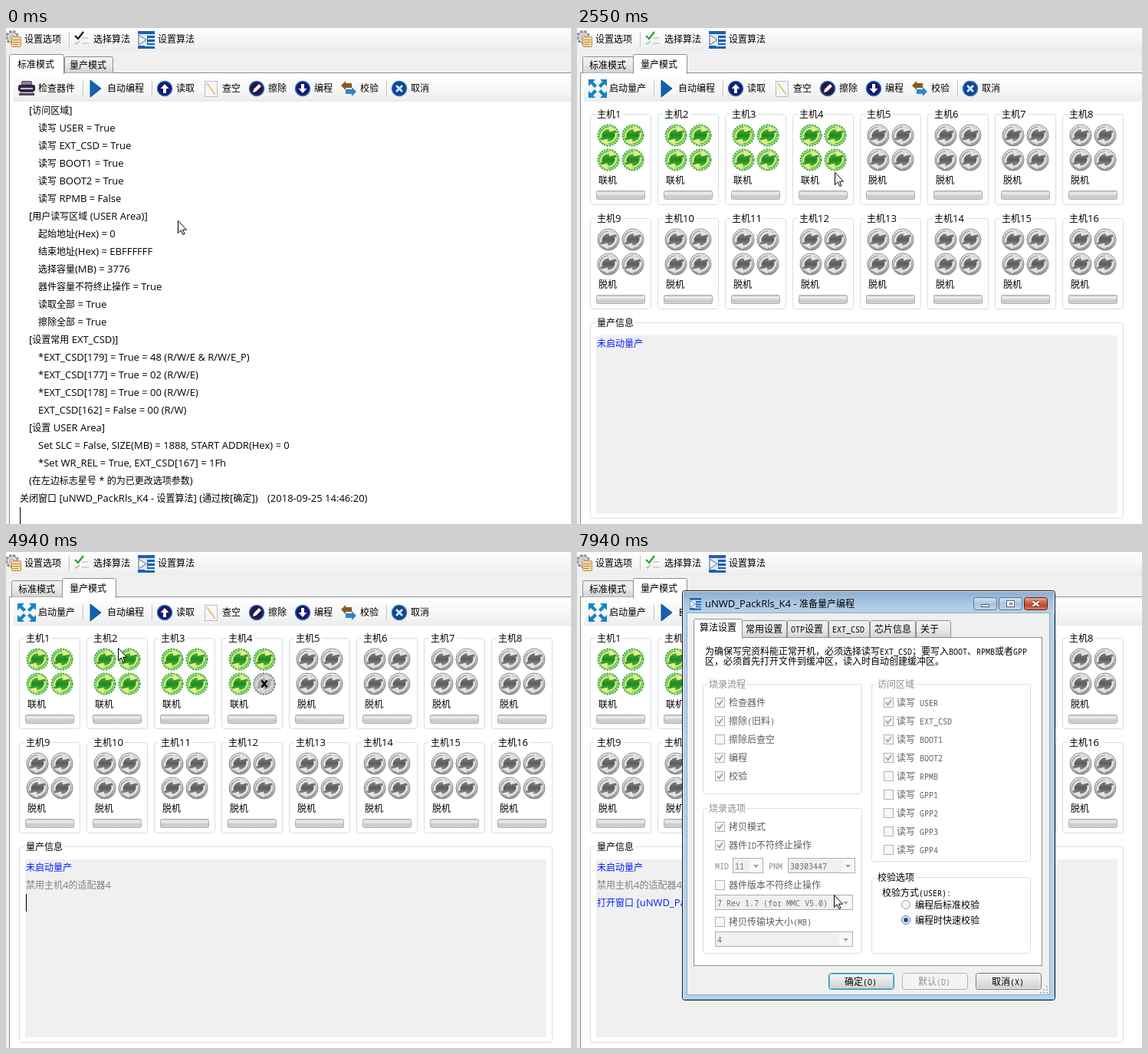
These frames come from a looping animation (737x647 px, 8000 ms). An HTML page:

```html
<!DOCTYPE html>
<html lang="zh-CN">
<head>
<meta charset="utf-8">
<title>量产模式</title>
<style>
html, body { margin: 0; width: 100%; height: 100%; overflow: hidden; background: #fff; }
svg { display: block; }
text { white-space: pre; font-family: 'Open Sans', 'Noto Sans', sans-serif; font-size: 13px; }
.c { font-family: 'Noto Sans CJK SC', 'Noto Sans CJK', 'Noto Sans CJK JP', sans-serif; font-size: 12px; }
.m { font-family: 'Noto Sans Mono', 'DejaVu Sans Mono', monospace; font-size: 10px; }
</style>
</head>
<body>
<svg id="stage" width="737" height="647" viewBox="0 0 737 647"></svg>
<script>
const LOOP = 8000;
const JOB = 'uNWD_PackRls_K4';
const GRAY = '#808080', LINE = '#d5dfe5';

// ---------- drawing helpers ----------
const text = (x, cy, s, fill = '#000', o = {}) =>
  `<text x="${x}" y="${cy + 4.5}" fill="${fill}" text-anchor="${o.mid ? 'middle' : 'start'}">` +
  s.match(/[\x20-\x7e]+|[^\x20-\x7e]+/g).map(run =>
    `<tspan class="${run.charCodeAt(0) > 126 ? 'c' : o.mono ? 'm' : ''}">${run}</tspan>`).join('') + '</text>';
const mono = (x, cy, s, fill, mid) => text(x, cy, s, fill, { mono: true, mid });
const rect = (x, y, w, h, fill, stroke, r = 0) => stroke
  ? `<rect x="${x + .5}" y="${y + .5}" width="${w - 1}" height="${h - 1}" rx="${r}" fill="${fill}" stroke="${stroke}"/>`
  : `<rect x="${x}" y="${y}" width="${w}" height="${h}" rx="${r}" fill="${fill}"/>`;
const path = (d, fill = 'none', stroke = 'none', w = 1) =>
  `<path d="${d}" fill="${fill}" stroke="${stroke}" stroke-width="${w}"/>`;
const disc = (x, y, r, fill, stroke = 'none', w = 1) =>
  `<circle cx="${x}" cy="${y}" r="${r}" fill="${fill}" stroke="${stroke}" stroke-width="${w}"/>`;
const at = (x, y, body) => `<g transform="translate(${x} ${y})">${body}</g>`;
const layer = (id, body, extra = '') => `<g id="${id}" ${extra}>${body}</g>`;
const grad = (id, ...stops) => `<linearGradient id="${id}" x2="0" y2="1">` +
  stops.map((c, i) => `<stop offset="${i / (stops.length - 1)}" stop-color="${c}"/>`).join('') + '</linearGradient>';
const box = (x, y, X, Y) => `M${x} ${y}H${X}V${Y}H${x}Z`;
const rule = (x, y, h) => rect(x, y, 1, h, '#bdbdbd') + rect(x + 1, y, 1, h, '#fff');

// Group box with a caption cutting its top edge
const group = (x, y, w, h, label, gap, draw = text, fill = '#000', dx = 9) =>
  rect(x, y, w, h, 'none', LINE, 3) + rect(x + dx - 2, y, gap + 4, 1, '#fff') + draw(x + dx, y, label, fill);

// ---------- icons ----------
const arrowPair = (color, w) => [0, 180].map(a => `<g transform="rotate(${a})">` +
  path('M-9.5 3.5A10 10 0 0 1 1 -9', 'none', color, w) + path('M0 -12.5L10.5 -7L1 -4.5Z', color) + '</g>').join('');
const rim = color => `<circle r="13.6" fill="none" stroke="${color}" stroke-width="1.6" stroke-dasharray="2.2 1.4"/>`;
const defs = `<defs>
${grad('bar', '#fdfdfd', '#f7f7f7', '#ececec')}
${grad('tabOff', '#f2f2f2', '#ebebeb', '#d2d2d2')}
${grad('btn', '#f3f3f3', '#ebebeb', '#dcdcdc', '#cfcfcf')}
${grad('hot', '#eaf6fd', '#d9f0fc', '#bee6fd', '#a7d9f5')}
${grad('meter', '#bcbcbc', '#f1f1f1', '#d6d6d6', '#c6c6c6', '#dedede')}
${grad('title', '#8caed0', '#a9c6e2', '#b9d1ea')}
${grad('cap', '#d4e4f3', '#a9c4de', '#bfd6ea')}
${grad('close', '#eab39c', '#d7694a', '#c0452c', '#d98b62')}
${grad('silver', '#f4f4f4', '#c9c9c9', '#8d8d8d')}
${grad('steel', '#8e8e8e', '#5c5c5c', '#a8a8a8')}
${grad('leaf', '#5fb95a', '#1e8a20', '#59c24a')}
${grad('ask', '#6ea5ea', '#1d52b4', '#3f86dc')}
${grad('tip', '#ffffff', '#e4e5f0')}
<g id="off">${disc(0, 0, 14, 'url(#silver)', '#868686')}${disc(0, 0, 11.5, 'url(#steel)')}${arrowPair('#e4e4e4', 2.8)}</g>
<g id="on">${disc(0, 0, 13.6, '#a9e58f')}${rim('#279a2b')}${disc(0, 0, 11.6, 'url(#leaf)')}${arrowPair('#cfee7c', 2.6)}
${path('M2 -12L10 -7L3 -5ZM-2 12L-10 7L-3 5Z', '#f6ec86')}</g>
<g id="ban">${disc(0, 0, 13.6, '#d2d2d2')}${rim('#777')}${disc(0, 0, 11.4, '#a9a9a9')}${arrowPair('#dadada', 2.6)}
${path('M-3.6 -4.5L3.6 4.5M3.6 -4.5L-3.6 4.5', 'none', '#000', 2.4)}</g>
<g id="list">${rect(0, 0, 22, 23, '#1c62ad')}${rect(0, 4, 12, 15, '#dfeaf6')}${path('M1 5L11 11.5L1 18Z', '#f2f2f2', '#4a6c91')}
${[4, 9, 14, 18].map((y, i) => rect(i % 3 ? 13 : 9, y, i % 3 ? 9 : 13, 2, '#cfe6fb')).join('')}</g>
<clipPath id="holes"><path clip-rule="evenodd" d="${box(137, 50, 624, 585)}${box(164, 121, 596, 153)}${box(164, 165, 372, 316)}${
  box(164, 325, 372, 525)}${box(384, 165, 592, 405)}${box(384, 417, 592, 525)}"/></clipPath>
</defs>`;
const use = (id, x, y, s = 1) => `<use href="#${id}" transform="translate(${x} ${y}) scale(${s})"/>`;

const gear = at(8, 12, `<circle r="7.5" fill="#cfcfcf" stroke="#8b8b8b" stroke-width="3" stroke-dasharray="3.2 2"/>` +
  disc(0, 0, 6.5, '#d8d8d8', '#999') + disc(0, 0, 2.5, '#fff', '#999')) +
  rect(7, 11, 13, 14, '#f5d9a4', '#b98a45', 1) + rect(9, 15, 9, 1, '#b98a45') + rect(9, 18, 9, 1, '#b98a45') + rect(9, 21, 7, 1, '#b98a45');
const checks = color => path('M90 10L94 14L101 5', 'none', color, 2.4) + path('M90 19L92 21L96 17', 'none', '#b5b5b5', 1.4) +
  rect(99, 12, 8, 2, '#d3d3d3') + rect(99, 19, 9, 2, '#d3d3d3');
const round = (x, body, fill = '#17186b') => at(x, 79, disc(0, 0, 9.6, fill, '#2f73c4', 1.4) + body);
const up = 'M0 -6L5.5 0H2V6H-2V0H-5.5Z';
const printer = rect(20, 69, 14, 6, '#8a8590', '#4c4454', 1) + rect(16, 74, 22, 9, '#3a2448', '#241530', 2) +
  rect(19, 78, 16, 2, '#c7bfd0') + rect(19, 83, 16, 5, '#d9d6dc', '#6b6472') + rect(17, 85, 20, 3, '#55475f');
const spread = at(27, 79, [0, 90, 180, 270].map(a => `<g transform="rotate(${a})">` +
  path('M-12 -12H-3L-6 -9L-1 -4L-4 -1L-9 -6L-12 -3Z', '#1583c7') + '</g>').join(''));

// ---------- main window ----------
const tools = rect(9, 63, 728, 33, 'url(#bar)') + rule(100, 69, 20) + rule(190, 69, 20) + rule(496, 69, 20) +
  path('M110 68L124 79L110 90Z', '#0e62b5', '#0a4d92') +
  round(207, path(up, '#fff')) +
  rect(259, 69, 17, 21, '#f6f6f8', '#b9bccb') + path('M262 72L273 87', 'none', '#e0b84c', 1.4) +
  round(327, path('M-5 5L-4 1L3 -6L6 -3L-1 4Z', '#fff'), '#2a1644') +
  round(387, `<g transform="rotate(180)">${path(up, '#fff')}</g>`) +
  path('M437 75L443 69V72H451V78H443V81Z', '#8a5a1f') + path('M457 83L451 77V80H443V86H451V89Z', '#2d86c9') +
  round(513, path('M-4 -4L4 4M4 -4L-4 4', 'none', '#cfe9ff', 2.8), '#14438f') +
  [['自动编程', 132], ['读取', 222], ['查空', 282], ['擦除', 342], ['编程', 402], ['校验', 462], ['取消', 528]]
    .map(([s, x]) => text(x, 78.5, s)).join('');

const tabPath = (x, X, y, y2) => `M${x + .5} ${y2}V${y + 2.5}Q${x + .5} ${y + .5} ${x + 2.5} ${y + .5}H${X - 2.5}Q${X - .5} ${y + .5} ${X - .5} ${y + 2.5}V${y2}`;
const tab = (x, X, on, extra = '') => path(tabPath(x, X, on ? 34 : 37, on ? 60 : 58.5), on ? '#fff' : 'url(#tabOff)', '#8c8e94') + extra;

const logLines = ['[访问区域]', '读写 USER = True', '读写 EXT_CSD = True', '读写 BOOT1 = True', '读写 BOOT2 = True', '读写 RPMB = False',
  '[用户读写区域 (USER Area)]', '起始地址(Hex) = 0', '结束地址(Hex) = EBFFFFFF', '选择容量(MB) = 3776', '器件容量不符终止操作 = True',
  '读取全部 = True', '擦除全部 = True', '[设置常用 EXT_CSD)]', '*EXT_CSD[179] = True = 48 (R/W/E &amp; R/W/E_P)',
  '*EXT_CSD[177] = True = 02 (R/W/E)', '*EXT_CSD[178] = True = 00 (R/W/E)', 'EXT_CSD[162] = False = 00 (R/W)', '[设置 USER Area]',
  'Set SLC = False, SIZE(MB) = 1888, START ADDR(Hex) = 0', '*Set WR_REL = True, EXT_CSD[167] = 1Fh',
  '(在左边标志星号 * 的为已更改选项参数)', `关闭窗口 [${JOB} - 设置算法] (通过按[确定])`];
const indent = s => s[0] === '关' ? 18 : '[('.includes(s[0]) ? 30 : 42;
const log = logLines.map((s, i) => text(indent(s), 107.5 + 23 * i, s)).join('') + text(341, 613.5, '(2018-09-25 14:46:20)');

function host(i) {
  const x = 17 + 88 * (i % 8), y = i < 8 ? 112 : 248, live = i < 4;
  const balls = [0, 1, 2, 3].map(k => use(live ? 'on' : 'off', x + 24 + 32 * (k % 2), y + 28 + 32 * (k >> 1))).join('');
  return layer('host' + i, group(x, y, 80, 119, '主机' + (i + 1), i < 9 ? 32 : 39) + balls +
    text(x + 11, y + 86, live ? '联机' : '脱机') + rect(x + 8, y + 100, 64, 12, 'url(#meter)', '#adadad', 2));
}
const hosts = Array.from({ length: 16 }, (_, i) => host(i)).join('');
const info = rect(9, 372, 728, 275, '#fff') + group(17, 384, 696, 256, '量产信息', 48) + rect(25, 401, 680, 232, '#f0f0f0') +
  text(26, 411.5, '未启动量产', '#0022ff');

const hoverBox = (id, x, y, w, h) => layer(id, rect(x, y, w, h, '#c2e0ff', '#3399ff'));
const mainWindow = rect(0, 0, 737, 647, '#f0f0f0') + rect(0, 0, 737, 30, 'url(#bar)') +
  hoverBox('hotGear', 0, 1, 77, 28) + hoverBox('hotPick', 85, 1, 84, 28) +
  gear + text(24, 14.5, '设置选项') + rule(82, 5, 20) + layer('checkOld', checks('#222')) + layer('checkNew', checks('#2fa53a')) +
  text(114, 14.5, '选择算法') + use('list', 172, 4) + text(198, 14.5, '设置算法') +
  rect(4, 58, 740, 600, '#fff', '#8c8e94') +
  layer('tabsA', tab(76, 140, false) + layer('hotTab', path(tabPath(76, 140, 37, 58.5), 'url(#hot)', '#3c7fb1')) +
    tab(4, 76, true) + text(15, 47, '标准模式') + text(83, 48.5, '量产模式')) +
  layer('tabsB', tab(7, 74, false) + tab(73, 144, true) + text(16, 48.5, '标准模式') + text(83, 47, '量产模式')) +
  tools + layer('probe', printer + text(42, 78.5, '检查器件')) +
  layer('start', hoverBox('hotStart', 13, 65, 84, 28) + layer('pressStart', rect(13, 65, 84, 28, '#99ccff', '#3399ff')) +
    spread + text(42, 78.5, '启动量产')) +
  layer('log', log) + layer('caretA', rect(18, 625, 1, 22, '#000')) +
  layer('cover', rect(9, 96, 728, 276, '#fff')) + layer('info', info) + hosts + layer('ban4', use('ban', 337, 172)) +
  layer('note', text(26, 434.5, '禁用主机4的适配器4', GRAY)) +
  layer('opened', text(26, 457.5, `打开窗口 [${JOB} - 准备量产编程]`, '#0022ff')) +
  layer('caretB', rect(26, 446, 1, 23, '#000'));

// ---------- dialogs ----------
const frame = (x, y, w, h) => rect(x, y, w, h, '#b9d1ea', '#111', 3) + rect(x + 1, y + 1, w - 2, h - 2, 'none', '#dff1fb', 2) +
  rect(x + 2, y + 2, w - 4, 28, 'url(#title)') + rect(x + 2, y + h - 2, w - 4, 1, '#62d3ee') + rect(x + w - 2, y + 30, 1, h - 32, '#7fd8ee');
const button = (x, y, w, h, fill = 'url(#btn)', stroke = '#707070') => rect(x, y, w, h, fill, stroke, 3) +
  rect(x + 1, y + 1, w - 2, h - 2, 'none', '#ffffffb0', 2);
const cross = (x, y, color, w) => path(`M${x - 4} ${y - 3}L${x + 4} ${y + 3}M${x + 4} ${y - 3}L${x - 4} ${y + 3}`, 'none', color, w);

const askBox = frame(175, 255, 416, 175) + text(183, 268.5, 'K-317 Rapid Multi Unit Duplicator') +
  text(414, 268.5, '[V2.0.2.9 #2017-12-23]') + rect(555, 260, 31, 17, 'url(#cap)', '#6f8cab', 3) +
  cross(570.5, 268.5, '#53657a', 3.6) + cross(570.5, 268.5, '#fff', 1.8) +
  rect(178, 280, 410, 92, '#fff') + rect(178, 372, 410, 55, '#f0f0f0') +
  disc(219, 326, 15, 'url(#ask)', '#b9c3d1', 2) + disc(219, 326, 13.6, 'none', '#e9f1fb', 1) +
  '<text x="219" y="335" text-anchor="middle" fill="#fff" style="font-size:24px;font-weight:700">?</text>' +
  text(243, 325, '禁用当前适配器？') + button(394, 385, 86, 28, 'url(#btn)', '#3c7fb1') +
  layer('hotYes', button(394, 385, 86, 28, 'url(#hot)', '#3c7fb1')) + text(437, 398.5, '是(Y)', '#000', { mid: true }) +
  button(492, 385, 86, 28) + text(535, 398.5, '否(N)', '#000', { mid: true });

const check = (x, cy, label, on, dx = 18) => rect(x, cy - 6, 13, 13, '#f7f7f7', '#b1b1b1') +
  (on ? path(`M${x + 3} ${cy}L${x + 5.5} ${cy + 3.5}L${x + 10} ${cy - 3}`, 'none', '#a0a0a0', 1.8) : '') + mono(x + dx, cy, label, '#5e5e5e');
const combo = (x, cy, w, s) => rect(x, cy - 10, w, 20, '#f0f0f0', '#afafaf') + rect(x + w - 18, cy - 9, 17, 18, '#f8f8f8') +
  path(`M${x + w - 13} ${cy - 1}h7l-3.5 4z`, '#a0a0a0') + mono(x + 3, cy, s, '#6d6d6d');
const radio = (cy, s, on) => disc(429, cy, 5.5, '#f4f4f4', on ? '#4d6f93' : '#9a9a9a') + (on ? disc(429, cy, 3, '#1c4f9c') : '') + mono(441, cy, s);

const prepBase = frame(137, 50, 487, 535) + use('list', 147, 60, .68) + text(167, 67.5, JOB + ' - 准备量产编程') +
  rect(517, 59, 31, 17, 'url(#cap)', '#5d7795', 3) + rect(527, 68, 11, 4, '#fff', '#53657a') +
  rect(550, 59, 31, 17, 'url(#cap)', '#5d7795', 3) + rect(560, 63, 11, 9, '#fff', '#53657a') + rect(564, 66, 4, 3, '#fff', '#53657a') +
  rect(583, 59, 31, 17, 'url(#close)', '#5a1d14', 3) + cross(598.5, 67.5, '#5a2a22', 4.2) + cross(598.5, 67.5, '#fff', 2.4) +
  rect(143, 79, 474, 499, '#f0f0f0', '#8fa9c4') + rect(156, 113, 448, 424, '#fff') +
  button(328, 549, 86, 22, 'url(#btn)', '#3c7fb1') + rect(329, 550, 84, 20, 'none', '#48d1f4', 2) + mono(370, 560, '确定(O)', '#000', true) +
  rect(424, 549, 86, 22, '#f4f4f4', '#adb2b5', 3) + mono(466, 560, '默认(D)', '#8d8d8d', true) +
  button(520, 549, 86, 22) + mono(562, 560, '取消(X)', '#000', true) +
  [0, 1, 2].map(r => [...Array(r + 1).keys()].map(c => rect(612 - 4 * c, 566 + 4 * r, 2, 2, '#b5b5b5')).join('')).join('');

const idCheck = check(180, 382, '器件ID不符终止操作', true);
const prepHalf = rect(180, 374, 132, 17, '#fff') + idCheck + rect(396, 435, 181, 56, '#fff') + rect(396, 439, 95, 12, '#f0f0f0') +
  rect(423, 452, 107, 16, '#f0f0f0') + rect(423, 472, 107, 16, '#f0f0f0');

const pageTabs = [[215, 274, '常用设置', 220], [274, 328, 'OTP设置', 279], [328, 382, 'EXT_CSD', 333], [382, 442, '芯片信息', 388], [442, 488, '关于', 448]]
  .map(([x, X, s, tx]) => path(tabPath(x, X, 89, 111.5), 'url(#tabOff)', '#8c8e94') + mono(tx, 100.5, s)).join('');
const access = ['USER', 'EXT_CSD', 'BOOT1', 'BOOT2', 'RPMB', 'GPP1', 'GPP2', 'GPP3', 'GPP4'];
const steps = ['检查器件', '擦除(旧料)', '擦除后查空', '编程', '校验'];
const prepFull = pageTabs + rect(152, 111, 455, 429, '#fff', '#8c8e94') + path(tabPath(152, 216, 87, 112.5), '#fff', '#8c8e94') + mono(160, 98.5, '算法设置') +
  mono(167, 129, '为确保写完资料能正常开机，必须选择读写EXT_CSD；要写入BOOT、RPMB或者GPP') +
  mono(167, 142, '区，必须首先打开文件到缓冲区，读入时自动创建缓冲区。') +
  group(164, 172, 208, 144, '烧录流程', 48, mono, '#8d8d8d', 8) + steps.map((s, i) => check(180, 196 + 24 * i, s, i !== 2)).join('') +
  group(164, 334, 208, 190, '烧录选项', 48, mono, '#8d8d8d', 8) + check(180, 358, '拷贝模式', true) + idCheck +
  mono(180, 409, 'MID', '#8d8d8d') + combo(203, 409, 40, '11') + mono(250, 409, 'PNM', '#8d8d8d') + combo(275, 409, 88, '30303447') +
  check(180, 434, '器件版本不符终止操作', false) + combo(180, 457, 180, '7 Rev 1.7 (for MMC V5.0)') +
  check(180, 482, '拷贝传输块大小(MB)', false) + combo(180, 505, 180, '4') +
  group(384, 172, 208, 232, '访问区域', 48, mono, '#8d8d8d', 8) + access.map((s, i) => check(400, 196 + 24 * i, '读写 ' + s, i < 4, 17)).join('') +
  group(384, 424, 208, 100, '校验选项', 48, mono, '#000', 8) + mono(398, 444.5, '校验方式(USER):') +
  radio(460, '编程后标准校验', false) + radio(480, '编程时快速校验', true);

const tooltip = rect(60, 115, 118, 23, '#00000030', '', 3) + rect(57, 112, 118, 22, 'url(#tip)', '#767676', 2) + text(63, 123, '启动量产编程器件...', '#575757');
const pointer = path('M.5 .5V16.5L4.2 13L6.8 18.5L9 17.5L6.5 12.2H11.5Z', '#fff', '#000');

document.getElementById('stage').innerHTML = defs + mainWindow + layer('ask1', askBox) +
  layer('prep', layer('base', prepBase) + layer('half', prepHalf) + layer('full', prepFull)) +
  layer('tooltip', tooltip) + layer('spot', disc(0, 0, 12, '#f6dc14'), 'opacity=".65"') + layer('cursor', pointer);

// ---------- motion ----------
const nodes = {};
document.querySelectorAll('g[id]').forEach(n => nodes[n.id] = n);
const show = (id, on) => { nodes[id].style.display = on ? '' : 'none'; };
const fade = (id, a) => { show(id, a > 0); nodes[id].style.opacity = a; };
const move = (id, x, y) => nodes[id].setAttribute('transform', `translate(${x} ${y})`);
const within = (t, ...spans) => spans.some(([a, b]) => t >= a && t < b);

// first step, last step, step count, end point
const moves = [[40, 260, 4, 112, 47], [500, 580, 2, 118, 18], [660, 820, 3, 88, 45], [1050, 1130, 2, 91, 46], [1750, 2230, 7, 337, 197],
  [2390, 2870, 7, 334, 174], [3190, 3990, 11, 420, 406], [4070, 4230, 3, 408, 397], [4460, 5260, 11, 34, 8], [5340, 5820, 7, 65, 93],
  [5980, 6220, 4, 58, 81], [7310, 7940, 9, 335, 447]];
function cursorAt(t) {
  let x = 224, y = 251;
  for (const [a, b, n, X, Y] of moves) {
    if (t < a) break;
    const k = Math.min(n, Math.floor((t - a) / (b - a) * (n - 1) + 1e-6) + 1) / n;
    const e = k * k * (3 - 2 * k);
    x += (X - x) * e;
    y += (Y - y) * e;
  }
  return [Math.round(x), Math.round(y)];
}

function render(t) {
  const [x, y] = cursorAt(t);
  const over = (l, tp, w, h) => x >= l && x < l + w && y >= tp && y < tp + h;
  const batch = t >= 1370, ready = t >= 1510, banned = t >= 4540;
  move('cursor', x, y);
  move('spot', x, y);
  show('spot', within(t, [1300, 1590], [3030, 3190], [4460, 4540], [7070, 7230]));

  show('hotGear', over(0, 1, 77, 28));
  show('hotPick', over(85, 1, 84, 28));
  show('hotTab', over(76, 37, 64, 22));
  show('hotStart', t < 7310 && over(13, 65, 84, 28));
  show('pressStart', within(t, [7070, 7310]));
  show('checkOld', t < 500);
  show('checkNew', t >= 500);

  show('tabsA', !batch);
  show('tabsB', batch);
  show('probe', !ready);
  show('start', ready);
  show('log', !ready);
  show('cover', batch);
  show('info', ready);
  const count = ready ? 16 : t >= 1440 ? 13 : batch ? 5 : 0;
  for (let i = 0; i < 16; i++) show('host' + i, i < count);

  show('caretA', within(t, [0, 190], [740, 1300]));
  show('caretB', within(t, [4630, 5160], [5690, 6220], [6760, 7230]));
  show('ban4', banned);
  show('note', banned);
  show('opened', t >= 7310);

  fade('ask1', t < 3190 || t >= 4620 ? 0 : t < 3270 ? .4 : t < 3350 ? .75 : t < 4540 ? 1 : .4);
  show('hotYes', t >= 4070);
  fade('tooltip', t < 6450 || t >= 7390 ? 0 : t < 6530 ? .35 : t < 6610 ? .7 : 1);

  const painted = t >= 7310;
  show('prep', t >= 7230);
  show('half', !painted);
  show('full', painted);
  if (painted) nodes.base.removeAttribute('clip-path');
  else nodes.base.setAttribute('clip-path', 'url(#holes)');
}

const began = performance.now();
function tick() {
  render((performance.now() - began) % LOOP);
  requestAnimationFrame(tick);
}
tick();
</script>
</body>
</html>
```
